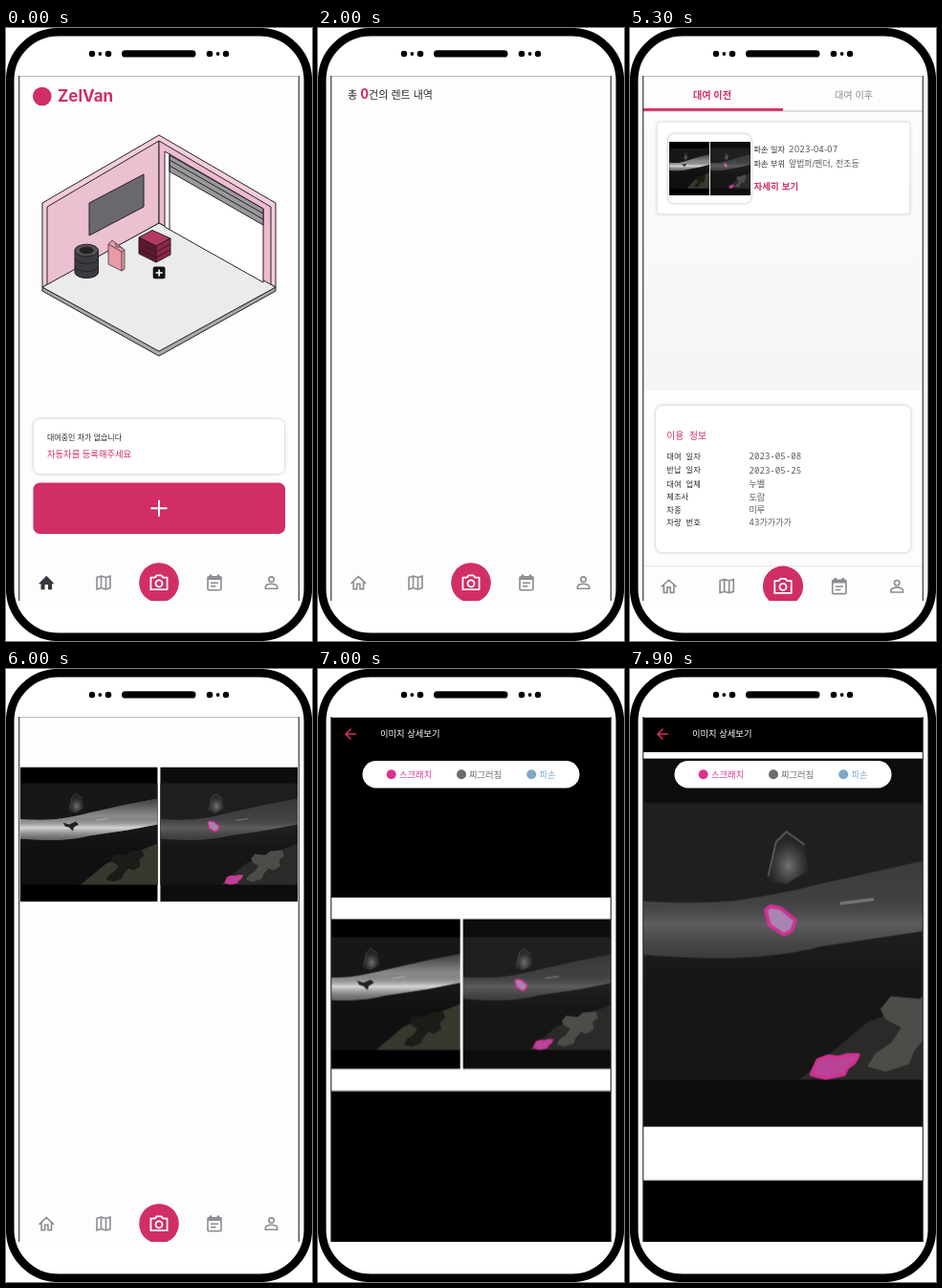
An HTML page that plays this animation: 320x641 px, repeating every 8000 ms.

```html
<!DOCTYPE html>
<html lang="ko">
<head>
<meta charset="utf-8">
<title>Rental app walkthrough</title>
<style>
  html, body { margin: 0; width: 100%; height: 100%; overflow: hidden; background: #fff; }
  svg { display: block; width: 100vw; height: 100vh; }
  text { font-family: "Noto Sans CJK KR", "Noto Sans CJK", sans-serif; font-size: 9.3px; fill: #2b282d; }
  .pink { fill: #d12d66; }
  .medium { font-weight: 500; }
  .bold { font-weight: 700; }
  .gray { fill: #8d8990; }
  .value { fill: #5d595f; }
  .brand { font: 700 17px Inter, sans-serif; }
  .tabs text { font-size: 10px; }
  .wide text { font-family: "DejaVu Sans", "Noto Sans CJK KR", sans-serif; }
  .wide .label { font-size: 8px; }
  .wide .value { font-size: 8.7px; }
  .mono text { font-family: "Noto Sans Mono", "Noto Sans CJK KR", monospace; }
  .mono .title { font-size: 9.6px; }
  .mono .label { font-size: 8.2px; }
  .mono .value { font-size: 9px; }
  .card { fill: #fff; stroke: #e3e0e5; filter: drop-shadow(0 .5px 1.5px #0002); }
  .pill { fill: #fff; filter: drop-shadow(0 1px 2px #0005); }
  .line { fill: none; stroke: #8f8b91; stroke-width: 1.6; }
  .ink { stroke: #262126; stroke-width: 1; stroke-linejoin: round; }

  /* page pushes: the old page grows a little, the new one zooms in and fades */
  .page { transform-origin: 160px 325px; }
  .page, .fade, .shade, .band { animation: 8s linear infinite; }
  .page { animation-timing-function: cubic-bezier(.4, 0, .2, 1); }
  #home { animation-name: homeZoom; }
  #list { animation-name: listZoom; }
  #detail { animation-name: detailZoom; }
  #images { animation-name: imagesZoom; }
  #viewer { animation-name: viewerZoom; }
  #listFade { animation-name: listFade; }
  #detailFade { animation-name: detailFade; }
  #imagesFade { animation-name: imagesFade; }
  #viewerFade { animation-name: viewerFade; }
  #scrim { animation-name: scrim; }
  .backdrop { animation-name: backdrop; }
  .band { animation-name: pinch; }

  @keyframes homeZoom { 0%, 20.625% { transform: scale(1); } 24.375%, 100% { transform: scale(1.05); } }
  @keyframes listZoom {
    0%, 20.625% { transform: scale(.85); } 24.375%, 41.5% { transform: scale(1); }
    45.25%, 100% { transform: scale(1.05); }
  }
  @keyframes detailZoom {
    0%, 41.5% { transform: scale(.85); } 45.25%, 65.25% { transform: scale(1); }
    69%, 100% { transform: scale(1.05); }
  }
  @keyframes imagesZoom {
    0%, 65.25% { transform: scale(.85); } 69%, 80.5% { transform: scale(1); }
    84.25%, 100% { transform: scale(1.05); }
  }
  @keyframes viewerZoom { 0%, 80.5% { transform: scale(.85); } 84.25%, 100% { transform: scale(1); } }
  @keyframes listFade { 0%, 21.25% { opacity: 0; } 21.9%, 100% { opacity: 1; } }
  @keyframes detailFade { 0%, 42.1% { opacity: 0; } 42.75%, 100% { opacity: 1; } }
  @keyframes imagesFade { 0%, 66.4% { opacity: 0; } 67.25%, 100% { opacity: 1; } }
  @keyframes viewerFade { 0%, 81.25% { opacity: 0; } 82.35%, 100% { opacity: 1; } }
  @keyframes scrim { 0%, 81% { opacity: 0; } 82.4%, 100% { opacity: .36; } }
  @keyframes backdrop { 0%, 82.5% { opacity: .38; } 84.25%, 100% { opacity: 1; } }
  @keyframes pinch {
    0%, 86.9% { transform: translate(160px, 344px) scale(1); }
    92.5% { transform: translate(69.5px, 305.5px) scale(2.03); }
    97.5%, 100% { transform: translate(4.7px, 286px) scale(2.73); }
  }

  .plain { --base: #161719; --bar: #9a9a9b; --floor: #38382f; --patch: #1b1b17; --pad: #000; --shine: 1; --mark: 0; --dent: 1; }
  .marked { --base: #1f1f20; --bar: #424244; --floor: #2a2a29; --patch: #4c4c49; --pad: #0d0d0e; --shine: .25; --mark: 1; --dent: 0; }
</style>
</head>
<body>
<svg viewBox="0 0 320 641" preserveAspectRatio="none">
  <defs>
    <clipPath id="screen"><path d="M14 50H306V599H14Z"/></clipPath>
    <clipPath id="belowBar"><path d="M0 87H320V641H0Z"/></clipPath>
    <linearGradient id="haze" x2="0" y2="1">
      <stop stop-color="#fdfcfd"/><stop offset="1" stop-color="#f5f4f6"/>
    </linearGradient>
    <linearGradient id="sheen" x2="0" y2="1">
      <stop stop-color="#000" stop-opacity=".6"/>
      <stop offset=".42" stop-color="#000" stop-opacity=".1"/>
      <stop offset=".7" stop-color="#fff" stop-opacity=".6"/>
      <stop offset="1" stop-color="#000" stop-opacity=".35"/>
    </linearGradient>
    <linearGradient id="dusk" x2="0" y2="1">
      <stop offset=".45" stop-opacity="0"/><stop offset=".65" stop-opacity=".3"/>
    </linearGradient>
    <radialGradient id="glow" cy=".65">
      <stop stop-color="#aaa" stop-opacity=".6"/><stop offset="1" stop-color="#777" stop-opacity=".08"/>
    </radialGradient>
    <path id="bumper" d="M0 54.5Q20 56 37 54.5 55 52 70 48L110 39 141 33V60L110 66 70 72Q45 79 0 75Z"/>

    <!-- bumper picture, plain or with damage marks -->
    <symbol id="scene" viewBox="0 0 141 141">
      <path style="fill:var(--pad)" d="M0 0H141V141H0Z"/>
      <path style="fill:var(--base)" d="M0 17H141V123H0Z"/>
      <path fill="url(#dusk)" d="M0 17H141V123H0Z"/>
      <path style="fill:var(--floor)" d="M62 123 88 101 141 80V123Z"/>
      <path style="fill:var(--patch)" d="M93 96 97 91 108 92 113 88 125 87 127 93 122 97 123 104 116 108 111 106 106 112 104 117 95 120 88 118 91 113 97 109 101 103 95 100Z"/>
      <use href="#bumper" style="fill:var(--bar)"/>
      <use href="#bumper" fill="url(#sheen)" style="opacity:var(--shine)"/>
      <path fill="url(#glow)" d="M50 47 53 31 57 28 64 33 65.5 43 57 48Z"/>
      <path d="M50 45 53 32 57 28 64 33" fill="none" stroke="#aaa" stroke-width=".6" opacity=".45"/>
      <path d="M78 55.5 90 54" stroke="#fff" stroke-width="1.2" stroke-linecap="round" opacity=".28"/>
      <path style="opacity:var(--dent)" fill="#242326" d="M44 58 50 60 57 57 60 60 55 63 54 67 50 63 46 62Z"/>
      <g style="opacity:var(--mark)" stroke="#cf3290" stroke-width="1.4" stroke-linejoin="round">
        <path fill="#a884b2" d="M49 58 51 56.5 55 57.5 60.5 62 59 66 56 67.5 50.5 64Z"/>
        <path fill="#b8459a" d="M66.5 121 69 115.5 73 114 77 114.5 80.5 113.5 84.5 113.5 83 116.5 80.3 118.4 79 121 72 122.4Z"/>
      </g>
    </symbol>
    <g id="pair">
      <use href="#scene" class="plain" x="-142.3" y="-70.5" width="141" height="141"/>
      <use href="#scene" class="marked" x="1.2" y="-70.5" width="141" height="141"/>
    </g>

    <path id="house" d="M-7.8.8 0-6.3 7.8.8M-5.2-1.4V6.6H-1.6V1.2H1.6V6.6H5.2V-1.4"/>
    <g id="nav">
      <g class="line">
        <path transform="translate(102 580)" d="M-7-5.6-2.5-7 2.5-5.6 7-7V5.6L2.5 7-2.5 5.6-7 7ZM-2.5-7V5.6M2.5-5.6V7"/>
        <g transform="translate(218 580)">
          <rect x="-7" y="-6.2" width="14" height="14" rx="1"/>
          <path d="M-7-4.4H7M-4-8.5V-5M4-8.5V-5" stroke-width="2.6"/>
          <path d="M-4 .3H4M-4 3.8H1.5"/>
        </g>
        <g transform="translate(277.5 580)">
          <circle cy="-3.4" r="2.7"/>
          <path d="M-6.2 6.2V4.2C-6.2 2.2-2.4 1.2 0 1.2S6.2 2.2 6.2 4.2V6.2Z"/>
        </g>
      </g>
      <circle cx="160" cy="580" r="20.8" class="pink"/>
      <g transform="translate(160 580)" fill="none" stroke="#fff" stroke-width="1.8">
        <path d="M-8.6-5.4H-4.3L-2.4-7.6H2.4L4.3-5.4H8.6V7.2H-8.6Z" stroke-linejoin="round"/>
        <circle cy=".8" r="3.5"/>
      </g>
    </g>
    <g id="navIdle"><use href="#nav"/><use href="#house" class="line" x="42.3" y="580"/></g>
    <path id="blank" fill="#fefdfe" d="M14 50H306V599H14Z"/>
  </defs>

  <rect width="320" height="641" fill="#fff"/>
  <rect x="4.2" y="4.2" width="311.6" height="632.6" rx="50.5" fill="#fff" stroke="#000" stroke-width="8.6"/>
  <rect x="121" y="23.3" width="77.5" height="7.2" rx="3.6"/>
  <g id="dots"><circle cx="90" cy="27" r="3.2"/><circle cx="98.4" cy="27" r="1.9"/><circle cx="107" cy="27" r="3.3"/></g>
  <use href="#dots" transform="matrix(-1 0 0 1 320 0)"/>

  <g clip-path="url(#screen)">
    <g class="page" id="home">
      <use href="#blank"/>
      <circle cx="37.8" cy="71.5" r="9.8" class="pink"/>
      <text x="54" y="77.3" class="pink brand">ZelVan</text>

      <g class="ink">
        <path fill="#f4cddb" d="M160 112 282 183V271L160 204 38 271V183Z"/>
        <path fill="#ebc0d0" d="M160 118 43 187V269L160 204Z"/>
        <path fill="#eebad0" d="M160 118 277 187V269L160 204Z"/>
        <path fill="#a9a7aa" d="M38 271 160 337 282 271V275L160 343 38 275Z"/>
        <path fill="#ebebec" d="M38 271 160 204 282 271 160 338Z"/>
        <path fill="#fff" d="M166 129 269 189V266L166 208Z"/>
        <path fill="#99989b" d="M171 133 269 189V206L171 150Z"/>
        <path fill="none" d="M171 131V211M171 138 269 194M171 144 269 200"/>
        <path fill="#69686c" d="M87 183 144 153V187L87 217Z"/>
        <path fill="#3c3a3f" d="M72 233V256A12.3 6 0 0 0 96.5 256V233Z"/>
        <path fill="none" d="M72 241A12.3 6 0 0 0 96.5 241M72 249A12.3 6 0 0 0 96.5 249"/>
        <ellipse cx="84.2" cy="232.5" rx="12.3" ry="6.3" fill="#555358"/>
        <ellipse cx="84.2" cy="232.5" rx="7" ry="3.4" fill="#222"/>
        <path fill="#e79aa7" stroke-width=".7" d="M107 226 111 222 124 232V252L121 254 107 247Z"/>
        <path fill="none" stroke-width=".7" d="M107 226 121 234 124 232M121 234V254M115 225V229H120L122 231"/>
        <path fill="#b33961" d="M139 219 153 211.5 172 220 157 228Z"/>
        <path fill="#63162f" d="M139 219 157 228V245L139 236Z"/>
        <path fill="#8f2449" d="M157 228 172 220V237L157 245Z"/>
        <path fill="none" d="M139 225 157 234 172 226M139 231 157 240 172 232"/>
      </g>
      <rect x="153.7" y="249.5" width="12.8" height="12.8" rx="2" fill="#151216"/>
      <path d="M156.5 256H163.7M160.1 252.4V259.6" stroke="#fff" stroke-width="1.6"/>

      <rect class="card" x="28.5" y="408.5" width="263" height="58" rx="7"/>
      <text x="43" y="431" style="font-size:8px">대여중인 차가 없습니다</text>
      <text x="43" y="449.3" class="pink medium">자동차를 등록해주세요</text>
      <rect x="28.5" y="475.5" width="263.5" height="53.5" rx="7" class="pink"/>
      <path d="M151.5 502.3H168.5M160 493.8V510.8" stroke="#fff" stroke-width="1.9"/>
      <use href="#nav"/>
      <path fill="#3b3541" transform="translate(42.3 580)" d="M-8.3 1.2 0-7.2 8.3 1.2H5.8V7.2H1.7V2H-1.7V7.2H-5.8V1.2Z"/>
    </g>

    <g class="fade" id="listFade"><g class="page" id="list">
      <use href="#blank"/>
      <text x="31" y="73.5" style="font-size:11px">총 <tspan class="pink bold" font-size="15">0</tspan>건의 렌트 내역</text>
      <use href="#navIdle"/>
    </g></g>

    <g class="fade" id="detailFade"><g class="page" id="detail">
      <use href="#blank"/>
      <path fill="url(#haze)" d="M14 90H306V378H14Z"/>
      <path fill="#dad7dc" d="M14 89.5H306V91H14Z"/>
      <path fill="#fefdfe" d="M14 50H306V89.5H14Z"/>
      <path class="pink" d="M14 87.5H160V90H14Z"/>
      <g class="tabs" text-anchor="middle">
        <text x="87" y="77.5" class="pink bold">대여 이전</text>
        <text x="233" y="77.5" class="gray">대여 이후</text>
      </g>

      <rect class="card" x="30" y="101.5" width="261" height="95" rx="4"/>
      <rect class="card" x="41" y="113.5" width="86.5" height="72" rx="7"/>
      <path d="M42.8 122H126.4V177H42.8Z"/>
      <use href="#pair" transform="translate(84.6 149.5) scale(.293 .39)"/>
      <path d="M84.6 122V177" stroke="#fff" stroke-width=".9"/>
      <g class="wide">
        <text x="130" y="132.5" class="label medium">파손 일자</text>
        <text x="130" y="147.5" class="label medium">파손 부위</text>
        <text x="166" y="132.7" class="value">2023-04-07</text>
        <text x="166" y="147.7" class="value">앞범퍼/펜더, 전조등</text>
        <text x="130" y="171" class="pink bold">자세히 보기</text>
      </g>

      <rect class="card" x="28.5" y="393.5" width="263.5" height="152" rx="7"/>
      <g class="mono">
        <text x="40" y="428.7" class="title pink medium">이용 정보</text>
        <text x="40" y="449.5" class="label medium">대여 일자</text>
        <text x="40" y="463.5" class="label medium">반납 일자</text>
        <text x="40" y="477.5" class="label medium">대여 업체</text>
        <text x="40" y="491" class="label medium">제조사</text>
        <text x="40" y="504" class="label medium">차종</text>
        <text x="40" y="517" class="label medium">차량 번호</text>
        <text x="125" y="449.7" class="value">2023-05-08</text>
        <text x="125" y="463.7" class="value">2023-05-25</text>
        <text x="125" y="477.7" class="value">누벨</text>
        <text x="125" y="491.2" class="value">도람</text>
        <text x="125" y="504.2" class="value">미루</text>
        <text x="125" y="517.2" class="value">43가가가가</text>
      </g>
      <path d="M14 559.5H306" stroke="#e2dfe4"/>
      <use href="#navIdle"/>
    </g></g>

    <g class="fade" id="imagesFade"><g class="page" id="images">
      <use href="#blank"/>
      <use href="#pair" transform="translate(160 173) scale(1.02 1)"/>
      <use href="#navIdle"/>
    </g></g>

    <path class="shade" id="scrim" d="M14 50H306V599H14Z"/>
    <g class="fade" id="viewerFade"><g class="page" id="viewer">
      <path class="shade backdrop" d="M14 50H306V599H14Z"/>
      <g clip-path="url(#belowBar)">
        <g class="band"><path fill="#fff" d="M-146-91H146V91H-146Z"/><use href="#pair"/></g>
      </g>
      <path class="shade backdrop" d="M14 20H306V87H14Z"/>
      <path d="M40 68H29M34.5 62.5 29 68 34.5 73.5" fill="none" stroke="#d12d66" stroke-width="1.5"/>
      <text x="65" y="71" class="medium" style="fill:#fff">이미지 상세보기</text>
      <rect class="pill" x="46.5" y="96" width="227" height="28.5" rx="14.2"/>
      <g class="medium" fill="#dd3190"><circle cx="76.7" cy="110.3" r="5"/><text x="85" y="113.6" style="fill:inherit">스크래치</text></g>
      <g class="medium" fill="#6c6a6d"><circle cx="150" cy="110.3" r="5"/><text x="158" y="113.6" style="fill:inherit">찌그러짐</text></g>
      <g class="medium" fill="#7ea9c5"><circle cx="223.2" cy="110.3" r="5"/><text x="231.5" y="113.6" style="fill:inherit">파손</text></g>
    </g></g>
  </g>

  <path d="M13 50.5H307" stroke="#bdb8c2"/>
  <path d="M13.7 50V599M306.3 50V599" stroke="#3a373c" stroke-width="1.2"/>
</svg>
</body>
</html>
```
